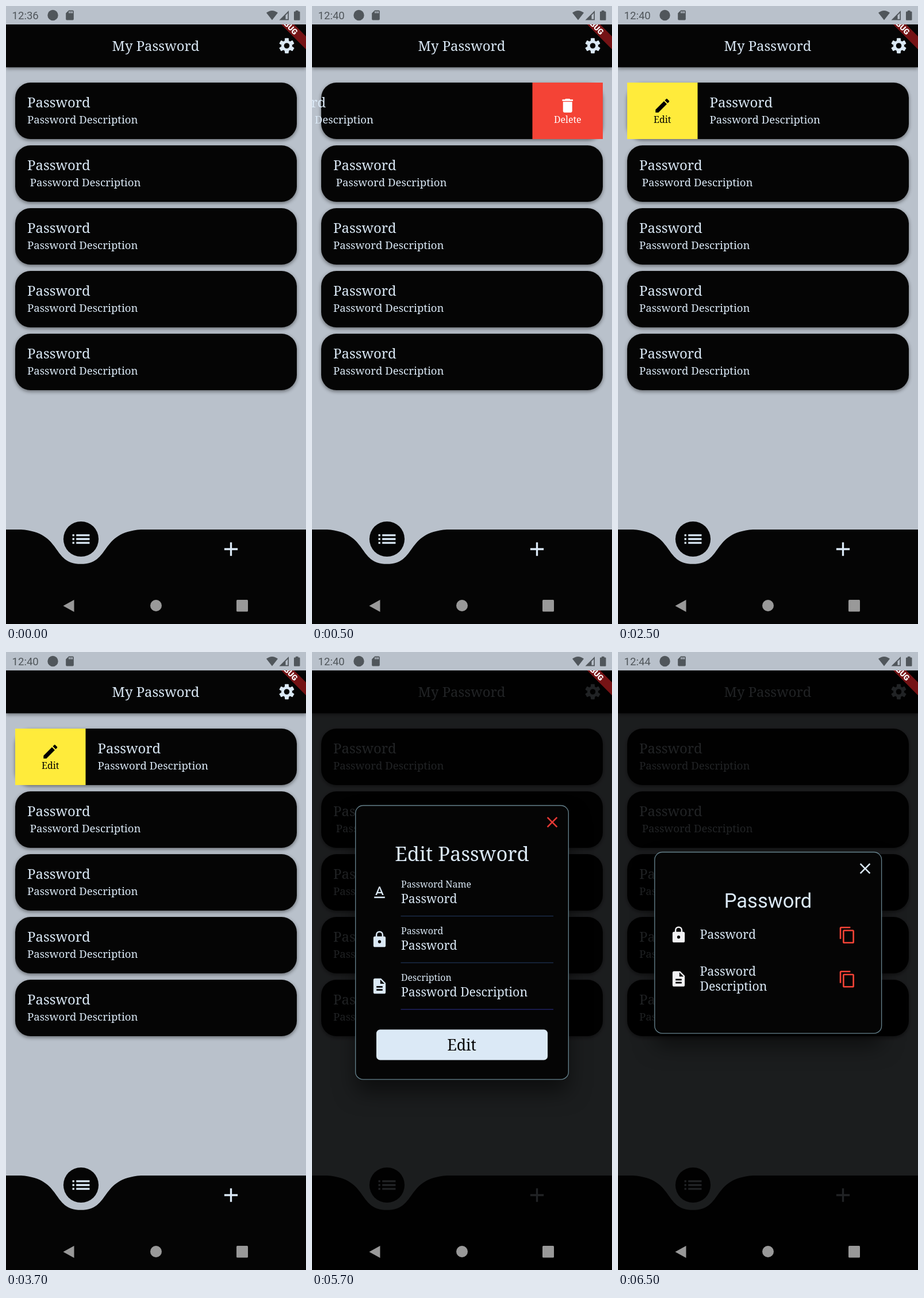
Recreate the animation shown at these times as an HTML page with a canvas. Size 522 by 1073 pixels, loop 8000 ms.

```html
<!DOCTYPE html>
<html lang="en">
<head>
<meta charset="utf-8">
<title>My Password</title>
<style>
html, body { margin: 0; width: 100%; height: 100%; overflow: hidden; background: #b9c1cb; }
canvas { display: block; width: 522px; height: 1073px; }
</style>
</head>
<body>
<canvas id="stage"></canvas>
<script>
const W = 522, H = 1073, DP = W / 392.73, LOOP = 8000;
const BG = '#b9c1cb', INK = '#050505', ICE = '#dbe9f6', RED = '#f44336', GREY = '#50565b';
const SERIF = '"Noto Serif", serif', SANS = 'Roboto, sans-serif';
const STATUS_H = 32, CARD = { x: 16, y: 133, w: 490, h: 98, step: 109 }, PANE = 122.5;

const canvas = document.getElementById('stage');
const ctx = canvas.getContext('2d');
const ratio = window.devicePixelRatio || 1;
canvas.width = W * ratio;
canvas.height = H * ratio;

// Outlines on a 24 unit grid
const icons = {
  list: 'M3 13h2v-2H3zM3 17h2v-2H3zM3 9h2V7H3zM7 13h14v-2H7zM7 17h14v-2H7zM7 7v2h14V7z',
  add: 'M19 13h-6v6h-2v-6H5v-2h6V5h2v6h6z',
  close: 'M19 6.41L17.59 5 12 10.59 6.41 5 5 6.41 10.59 12 5 17.59 6.41 19 12 13.41 17.59 19 19 17.59 13.41 12z',
  trash: 'M6 19c0 1.1.9 2 2 2h8c1.1 0 2-.9 2-2V7H6zM19 4h-3.5l-1-1h-5l-1 1H5v2h14z',
  pencil: 'M3 17.25V21h3.75L17.81 9.94l-3.75-3.75zM20.71 7.04c.39-.39.39-1.02 0-1.41l-2.34-2.34c-.39-.39-1.02-.39-1.41 0l-1.83 1.83 3.75 3.75z',
  letter: 'M5 17v2h14v-2zM9.5 12.8h5l.9 2.2h2.1L12.75 4h-1.5L6.5 15h2.1zM12 5.98L13.87 11h-3.74z',
  lock: 'M18 8h-1V6A5 5 0 0 0 7 6v2H6a2 2 0 0 0-2 2v10a2 2 0 0 0 2 2h12a2 2 0 0 0 2-2V10a2 2 0 0 0-2-2zM12 17a2 2 0 0 1 0-4 2 2 0 0 1 0 4zM15.1 8H8.9V6a3.1 3.1 0 0 1 6.2 0z',
  page: 'M14 2H6a2 2 0 0 0-2 2v16a2 2 0 0 0 2 2h12a2 2 0 0 0 2-2V8zM16 18H8v-2h8zM16 14H8v-2h8zM13 9V3.5L18.5 9z',
  copy: 'M16 1H4a2 2 0 0 0-2 2v14h2V3h12zM19 5H8a2 2 0 0 0-2 2v14a2 2 0 0 0 2 2h11a2 2 0 0 0 2-2V7a2 2 0 0 0-2-2zM19 21H8V7h11z',
  card: 'M18 2h-8L4 8v12a2 2 0 0 0 2 2h12a2 2 0 0 0 2-2V4a2 2 0 0 0-2-2zM12 8h-2V4h2zM15 8h-2V4h2zM18 8h-2V4h2z'
};
for (const name in icons) icons[name] = new Path2D(icons[name]);

function icon(name, cx, cy, color, size = 24 * DP) {
  ctx.save();
  ctx.translate(cx, cy);
  ctx.scale(size / 24, size / 24);
  ctx.translate(-12, -12);
  ctx.fillStyle = color;
  ctx.fill(icons[name], 'evenodd');
  ctx.restore();
}

function text(str, x, y, dp, color = ICE, align = 'left', family = SERIF, weight = 400) {
  ctx.font = `${weight} ${dp * DP}px ${family}`;
  ctx.textAlign = align;
  ctx.fillStyle = color;
  ctx.fillText(str, x, y);
}

function rect(x, y, w, h, color) {
  ctx.fillStyle = color;
  ctx.fillRect(x, y, w, h);
}

function round(x, y, w, h, r, color) {
  ctx.beginPath();
  ctx.roundRect(x, y, w, h, r);
  ctx.fillStyle = color;
  ctx.fill();
}

function disc(x, y, r, color) {
  ctx.beginPath();
  ctx.arc(x, y, r, 0, Math.PI * 2);
  ctx.fillStyle = color;
  ctx.fill();
}

function poly(color, ...pts) {
  ctx.beginPath();
  for (const [x, y] of pts) ctx.lineTo(x, y);
  ctx.closePath();
  ctx.fillStyle = color;
  ctx.fill();
}

function shadowed(alpha, blur, dy, draw) {
  ctx.save();
  ctx.shadowColor = `rgba(0,0,0,${alpha})`;
  ctx.shadowBlur = blur * ratio;
  ctx.shadowOffsetY = dy * ratio;
  draw();
  ctx.restore();
}

function gear(cx, cy) {
  ctx.save();
  ctx.translate(cx, cy);
  ctx.scale(DP, DP);
  disc(0, 0, 7.2, ICE);
  for (let i = 0; i < 6; i++) {
    poly(ICE, [-2, -10], [2, -10], [2.4, -9.6], [2.8, -6.6], [-2.8, -6.6], [-2.4, -9.6]);
    ctx.rotate(Math.PI / 3);
  }
  disc(0, 0, 3.6, INK);
  ctx.restore();
}

function appBar() {
  shadowed(0.4, 6, 2.5, () => rect(0, STATUS_H, W, 74.4, INK));
  text('My Password', 260.5, 77.5, 18, ICE, 'center');
  gear(488.5, 69);
}

function cards(slide) {
  for (let i = 0; i < 5; i++) {
    const { x, w, h } = CARD, y = CARD.y + i * CARD.step;
    const dx = i ? 0 : slide * PANE;
    shadowed(0.45, 6, 2.5, () => round(x, y, w, h, 20 * DP, INK));
    text('Password', 37 + dx, y + 43, 18);
    text((i === 1 ? ' ' : '') + 'Password Description', 37 + dx, y + 70.5, 14);
    if (dx < 0) action(x + w - PANE, RED, 'trash', 'Delete', '#fff');
    if (dx > 0) action(x, '#ffeb3b', 'pencil', 'Edit', '#000');
  }
}

function action(x, back, glyph, label, color) {
  const mid = x + PANE / 2;
  rect(x, CARD.y, PANE, CARD.h, back);
  icon(glyph, mid, CARD.y + 40, color);
  text(label, mid, CARD.y + 70, 12, color, 'center');
}

function tabBar() {
  const top = 909, low = top + 59.8, mid = W / 4;
  ctx.beginPath();
  ctx.moveTo(0, top);
  ctx.lineTo(W * 0.05, top);
  ctx.bezierCurveTo(W * 0.19, top + 5, W * 0.15, low, mid, low);
  ctx.bezierCurveTo(W * 0.35, low, W * 0.31, top + 5, W * 0.45, top);
  ctx.lineTo(W, top);
  ctx.lineTo(W, H);
  ctx.lineTo(0, H);
  ctx.fillStyle = INK;
  ctx.fill();
  disc(mid, 925.5, 30.6, INK);
  icon('list', mid, 925.5, ICE, 30 * DP);
  icon('add', W * 0.75, 943, ICE, 30 * DP);
}

function banner() {
  ctx.save();
  ctx.beginPath();
  ctx.rect(0, STATUS_H, W, H);
  ctx.clip();
  ctx.translate(W, 0);
  ctx.rotate(Math.PI / 4);
  rect(-40 * DP, 28 * DP, 80 * DP, 12 * DP, '#751315');
  text('DEBUG', 0, 34 * DP + 4.9, 10.2, '#fff', 'center', SANS, 900);
  ctx.restore();
}

function statusBar(clock) {
  rect(0, 0, W, STATUS_H, BG);
  text(clock, 10.5, 23, 14, GREY, 'left', SANS);
  disc(81.5, 16, 9.2, GREY);
  icon('card', 111, 16, GREY, 20.5);
  ctx.beginPath();
  ctx.moveTo(463, 24.5);
  ctx.lineTo(453, 11.8);
  ctx.quadraticCurveTo(463, 4, 473, 11.8);
  ctx.closePath();
  ctx.fillStyle = GREY;
  ctx.fill();
  poly(GREY, [475.5, 24.5], [492, 8], [492, 24.5]);
  poly(BG, [486.5, 16.2], [490.3, 12.2], [490.3, 22.8], [486.5, 22.8]);
  round(501, 9.5, 10.5, 15.2, 1.2, GREY);
  rect(504, 7.8, 4.5, 2.5, GREY);
}

function systemBar() {
  const c = '#999';
  poly(c, [99.5, 1041.5], [118.5, 1031], [118.5, 1052]);
  disc(261, 1041, 10, c);
  round(401, 1031, 20, 20.5, 1.5, c);
}

function panel(x, y, w, h) {
  shadowed(0.5, 36, 22, () => round(x, y, w, h, 10 * DP, INK));
  ctx.strokeStyle = '#66828d';
  ctx.lineWidth = DP;
  ctx.stroke();
}

function editDialog() {
  panel(75.7, 266.5, 370.6, 475.7);
  icon('close', 418, 295.5, '#e53935');
  text('Edit Password', 261, 363, 26, ICE, 'center');
  const fields = [
    ['letter', 'Password Name', 'Password', '#1c2d4c'],
    ['lock', 'Password', 'Password', '#1c2d4c'],
    ['page', 'Description', 'Password Description', '#23256a']
  ];
  fields.forEach(([glyph, label, value, line], i) => {
    const y = 418 + i * 81;
    icon(glyph, 117.5, y, ICE);
    text(label, 155, y - 9, 12);
    text(value, 155, y + 18, 16);
    rect(154.5, y + 39.8, 265.5, 1.4, line);
  });
  round(112, 655.5, 298, 53, 6.6, ICE);
  text('Edit', 260.5, 691.5, 20, '#050505', 'center');
}

function viewDialog() {
  panel(63.8, 347.5, 394.8, 314.7);
  icon('close', 430, 376, ICE);
  text('Password', 261, 444, 26, ICE, 'center', SANS);
  const rows = [['lock', 491, ['Password']], ['page', 567.5, ['Password', 'Description']]];
  for (const [glyph, y, lines] of rows) {
    icon(glyph, 105.5, y, '#f2f2f4');
    lines.forEach((s, i) => text(s, 142.5, y + 7 + (i - (lines.length - 1) / 2) * 26, 16));
    icon('copy', 399, y + 0.5, RED);
  }
}

const scenes = [
  { until: 500, clock: '12:36', slide: 0 },
  { until: 2500, clock: '12:40', slide: -1 },
  { until: 4500, clock: '12:40', slide: 1 },
  { until: 6500, clock: '12:40', slide: 0, dialog: editDialog },
  { until: LOOP, clock: '12:44', slide: 0, dialog: viewDialog }
];

function draw(scene) {
  ctx.setTransform(ratio, 0, 0, ratio, 0, 0);
  rect(0, 0, W, H, BG);
  appBar();
  cards(scene.slide);
  tabBar();
  if (scene.dialog) {
    rect(0, STATUS_H, W, H, 'rgba(0,0,0,0.85)');
    scene.dialog();
  }
  banner();
  statusBar(scene.clock);
  systemBar();
}

const start = performance.now();
function tick(now) {
  const t = Math.max(0, now - start) % LOOP;
  draw(scenes.find(s => t < s.until));
  requestAnimationFrame(tick);
}
tick(start);
</script>
</body>
</html>
```
